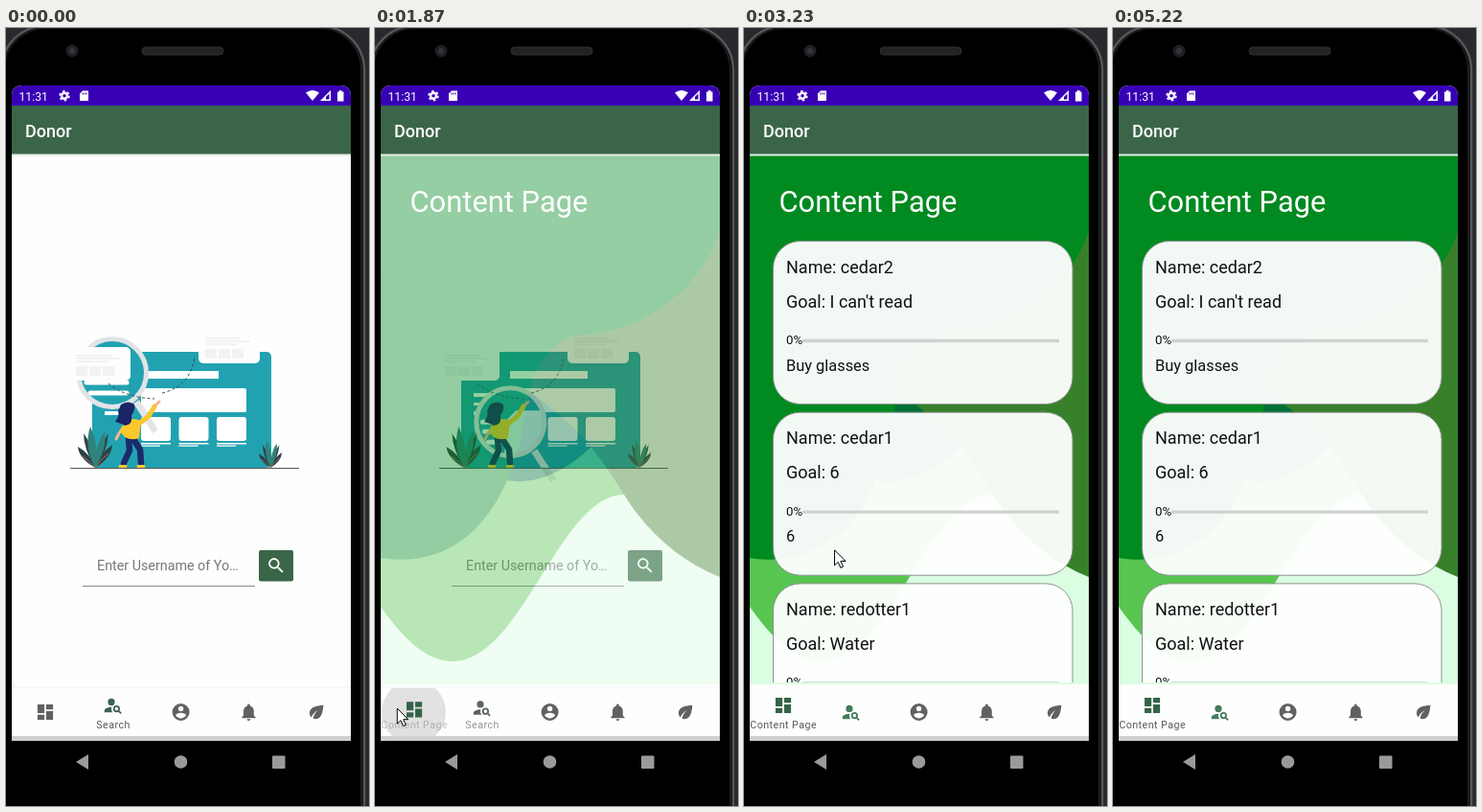
An HTML page for the animation above (5.76 s loop, 379 px wide and 812 px high).

```html
<!DOCTYPE html>
<html lang="en">
<head>
<meta charset="utf-8">
<title>Donor app</title>
<style>
  html, body { margin: 0; width: 100%; height: 100%; overflow: hidden; background: #28292d; }
  svg { display: block; width: 100vw; height: 100vh; font-family: Roboto, sans-serif; }
  .label { font-size: 10.7px; letter-spacing: .46px; text-anchor: middle; fill: #565c59; }
</style>
</head>
<body>
<svg viewBox="0 0 379 812">
  <defs>
    <clipPath id="screen"><path d="M6 744V71q0-11 11-11H349q11 0 11 11V744z"/></clipPath>
    <clipPath id="list"><rect x="27" y="218" width="320" height="465"/></clipPath>
    <clipPath id="nav"><rect x="6" y="689" width="354" height="51"/></clipPath>
    <clipPath id="glass"><circle r="35"/></clipPath>
    <g id="note">
      <rect width="64" height="35" rx="5" fill="#fdfdfd"/>
      <path d="M7 9H44M7 12H54M7 15H40" stroke="#f0f0f0" stroke-width="1.3"/>
      <path d="M7 20h12v10H7zM21 20h12v10H21zM35 20h12v10H35z" fill="#f2f2f2"/>
    </g>
    <g id="plant">
      <g fill="#2d4149">
        <path d="M0 0Q-17-10-18-22Q-5-15 0 0Q5-15 18-24Q17-10 0 0"/>
        <path d="M0 0Q-12-20-12-36Q0-20 0 0Q4-22 14-36Q12-14 0 0"/>
      </g>
      <path d="M0 0Q-12-22-5-43Q5-22 0 0Q0-25 10-38Q13-20 0 0" fill="#2f837c"/>
      <path d="M0 0Q-6-8-15-13M0 0Q7-10 14-15" fill="none" stroke="#d98b62" stroke-width=".7"/>
    </g>
  </defs>

  <!-- Phone -->
  <rect x="-5" y="-2" width="379" height="900" rx="46" fill="#000" stroke="#55585b" stroke-width="2.500"/>
  <rect x="-2" y="0" width="373" height="900" rx="43" fill="none" stroke="#1c1d1f" stroke-width="2"/>
  <circle cx="69" cy="24" r="6.5" fill="#1f2023"/><circle cx="69" cy="24" r="3" fill="#34363c"/>
  <rect x="142" y="20" width="85" height="8" rx="4" fill="#232325" stroke="#303033"/>
  <g fill="#9a9a9a">
    <path d="M73 766L86 758V774z"/><circle cx="182.500" cy="766" r="6.800"/><rect x="278" y="759.500" width="13.500" height="13.500" rx="1"/>
  </g>

  <g clip-path="url(#screen)">
    <rect x="6" y="60" width="354" height="684" fill="#fefefe"/>

    <!-- Search page -->
    <g id="searchPage">
      <rect x="90" y="338" width="187" height="121" rx="5" fill="#22a2b1"/>
      <g fill="#fff">
        <rect x="141" y="358" width="81" height="8"/>
        <rect x="141" y="376" width="110" height="25" rx="2"/>
        <g id="tiles"></g>
        <path d="M103 381h22v4h-22zM103 391h18v3h-18zM103 400h24v4h-24z"/>
      </g>
      <g id="lens">
        <path d="M25 30L45 61" stroke="#e3e5e7" stroke-width="7"/>
        <g clip-path="url(#glass)">
          <circle r="36" fill="#22a2b1"/>
          <path d="M-29 0H13M-27 10H15M-23 21H15" stroke="#fff" stroke-width="5" stroke-linecap="round"/>
          <path id="pale" d="M6-12H40V40H-6V0z" fill="#e1f5f7"/>
        </g>
        <circle r="35.500" fill="none" stroke="#e1e4e6" stroke-width="5"/>
      </g>
      <use href="#note" x="201" y="315"/>
      <use href="#note" x="66" y="333"/>
      <path d="M107 371Q125 386 155 387M163 381Q192 374 197 344" fill="none" stroke="#37474f" stroke-dasharray="3 2.500"/>
      <path d="M67 459.500H306" stroke="#555" stroke-width="1.200"/>
      <use href="#plant" id="plantL"/><use href="#plant" id="plantR"/>
      <!-- Woman -->
      <g fill="none" stroke-linecap="round" stroke-linejoin="round">
        <path d="M128 429L129 441L123 454M133 429L140 440L141 454" stroke="#1b2a6b" stroke-width="6.500"/>
        <path d="M119 457.500H125M138 457.500H144" stroke="#fdc82f" stroke-width="3"/>
        <path d="M125 413L118 423L115 429" stroke="#f6b58f" stroke-width="3"/>
        <path d="M139 413L149 405L155 395" stroke="#fdc82f" stroke-width="5"/>
        <path d="M156 394L160 390" stroke="#f6b58f" stroke-width="3"/>
      </g>
      <path d="M124 410Q132 406 141 410L139 428Q131 431 124 427L119 421z" fill="#fdc82f"/>
      <path d="M120 393Q128 388 134 393Q135 400 131 404Q133 414 124 415Q121 413 114 411Q119 404 117 400z" fill="#1b2467"/>
      <path d="M80 582.500H260" stroke="#8a8a8a"/>
      <text x="95" y="566" font-size="14.300" fill="#777">Enter Username of Yo…</text>
      <rect x="264" y="545" width="36" height="32.500" rx="2" fill="#3b6549"/>
      <path transform="translate(271.500 550.500) scale(.88)" fill="#fff" d="M15.500 14h-.79l-.28-.27C15.410 12.590 16 11.110 16 9.500 16 5.910 13.090 3 9.500 3S3 5.910 3 9.500 5.910 16 9.500 16c1.610 0 3.090-.59 4.230-1.570l.27.28v.79l5 4.990L20.490 19l-4.990-5zm-6 0C7 14 5 12 5 9.500S7 5 9.500 5 14 7 14 9.500 12 14 9.500 14z"/>
    </g>

    <!-- Content page -->
    <g id="contentPage">
      <rect x="6" y="132" width="354" height="553" fill="#dbfde2"/>
      <path d="M6 604C35 645 58 661 81 661C154 661 192 487 260 487V300H6z" fill="#58c551"/>
      <path d="M137 472C165 477 195 466 226 437L200 370H140z" fill="#007039"/>
      <path d="M160 380C200 405 230 437 260 487C284 526 318 556 360 573V200L190 300z" fill="#378029"/>
      <path d="M6 133V553C100 568 146 484 156 405C164 345 189 323 217 320C275 316 334 282 360 213V133z" fill="#008a20"/>
      <text x="36.500" y="192" font-size="30.900" fill="#fff">Content Page</text>
      <g clip-path="url(#list)">
        <g id="cards"></g>
        <path id="glow" d="M27 683Q187 671 347 683" fill="#777"/>
      </g>
    </g>

    <!-- App and status bars -->
    <rect x="6" y="131" width="354" height="2.500" fill="#e8ece9"/>
    <rect x="6" y="81" width="354" height="50.500" fill="#3b6549"/>
    <rect x="6" y="60" width="354" height="21" fill="#3800b5"/>
    <text x="20" y="114" font-size="18" font-weight="500" fill="#fff">Donor</text>
    <text x="13.500" y="75.500" font-size="12.200" fill="#fff">11:31</text>
    <g fill="#fff">
      <g fill="none" stroke="#fff">
        <circle cx="61" cy="70.800" r="3" stroke-width="2.400"/>
        <circle cx="61" cy="70.800" r="4.900" stroke-width="1.600" stroke-dasharray="2.565"/>
      </g>
      <path d="M80 65.500H86V76H77V68.500z"/>
      <path d="M80 67.500v2M82 67.500v2M84 67.500v2" stroke="#3800b5"/>
      <path d="M313 67.500Q320 62.500 327 67.500L320 76z"/>
      <path d="M339 65V76H328z"/><path d="M337.500 68.500V74.500H334V72z" fill="#3800b5"/>
      <path d="M346 66.500H348V65H350.500V66.500H352.500V76.500H346z"/>
    </g>

    <!-- Bottom navigation -->
    <rect x="6" y="685" width="354" height="55" fill="#fefefe"/>
    <path id="navLine" d="M6 688H360" stroke="#f1f1f1"/>
    <rect x="6" y="739" width="354" height="5" fill="#cfd1d0"/>
    <circle id="ripple" cx="40.500" cy="714" fill="#d5d5d5" clip-path="url(#nav)"/>
    <g id="icons"></g>
    <text class="label" id="homeLabel" x="41.200" y="730.500">Content Page</text>
    <text class="label" id="searchLabel" x="112" y="730.500">Search</text>
  </g>
  <path id="cursor" d="M0 0V16L3.700 12.600L6.300 18.500L9 17.300L6.400 11.600H11.500z" fill="#fff" stroke="#000"/>
</svg>
<script>
const LOOP = 5760;
const $ = id => document.getElementById(id);
const clamp = v => Math.min(1, Math.max(0, v));
const ramp = (t, from, to) => clamp((t - from) / (to - from));
const ease = p => (1 - Math.cos(Math.PI * p)) / 2;
const fade = (id, v) => $(id).setAttribute('opacity', v);
const place = (id, v) => $(id).setAttribute('transform', v);

// Keys are [time, x, y]; the result is a smooth curve through them.
function follow(keys, t) {
  let i = 0;
  while (i < keys.length - 2 && t >= keys[i + 1][0]) i++;
  const a = keys[i], b = keys[i + 1];
  const prev = keys[i - 1] || a, next = keys[i + 2] || b;
  const span = b[0] - a[0], p = ramp(t, a[0], b[0]);
  return [1, 2].map(k => {
    const m0 = (b[k] - prev[k]) / (b[0] - prev[0]) * span;
    const m1 = (next[k] - a[k]) / (next[0] - a[0]) * span;
    const d = b[k] - a[k];
    return a[k] + p * (m0 + p * (3 * d - 2 * m0 - m1 + p * (m0 + m1 - 2 * d)));
  });
}

$('tiles').innerHTML = [141, 180.5, 220].map(x =>
  `<rect x="${x}" y="406" width="31" height="25" rx="3"/>
   <path d="M${x} 433h31v1.500h-31zM${x} 435.500h20v1.300h-20z"/>`).join('');

const goals = [
  ['cedar2', "I can't read", 'Buy glasses'],
  ['cedar1', '6', '6'],
  ['redotter1', 'Water', "Don't drink beer, drink water"],
];
$('cards').innerHTML = goals.map(([name, goal, detail], i) => `<g id="card${i}">
  <rect x="30.500" y="222.500" width="312.500" height="170" rx="28" fill="#fff" fill-opacity=".95" stroke="#8f9490"/>
  <g fill="#111" font-size="18">
    <text x="44" y="255.500">Name: ${name}</text><text x="44" y="291.700">Goal: ${goal}</text>
    <text x="44" y="330" font-size="13.200">0%</text><text x="44" y="357.700" font-size="16.400">${detail}</text>
  </g>
  <path d="M61 326.500H329" stroke="#d0d1d0" stroke-width="3.300"/></g>`).join('');

const icons = [
  'M3 13h8V3H3zM3 21h8v-6H3zM13 21h8V11h-8zM13 3v6h8V3z',
  'M10 12a4 4 0 1 0 0-8a4 4 0 0 0 0 8zM10.350 14C7.600 13.900 2 15.300 2 18v2h9.540c-2.470-2.760-1.230-5.900-1.190-6zM19.430 18c.36-.6.57-1.260.57-2a4 4 0 1 0-4 4c.74 0 1.430-.2 2-.57L20.600 22 22 20.600zM16 18a2 2 0 1 1 0-4a2 2 0 0 1 0 4z',
  'M12 2a10 10 0 1 0 0 20a10 10 0 0 0 0-20zM12 5a3 3 0 1 1 0 6a3 3 0 0 1 0-6zM12 19.200c-2.500 0-4.700-1.280-6-3.220.03-2 4-3.080 6-3.080s5.970 1.080 6 3.080c-1.300 1.940-3.500 3.220-6 3.220z',
  'M12 22c1.100 0 2-.9 2-2h-4c0 1.100.9 2 2 2zM18 16v-5c0-3.070-1.640-5.640-4.500-6.320V4a1.500 1.500 0 0 0-3 0v.68C7.630 5.360 6 7.920 6 11v5l-2 2v1h16v-1z',
  'M6 8c-2.700 2.700-2.700 7.200 0 9.900 1.500-3.400 4.100-6.200 7.400-7.900-2.800 2.300-4.700 5.600-5.400 9.300 2.600 1.200 5.800.8 8-1.400C19.400 14.500 20 4 20 4S9.500 4.600 6 8z',
];
$('icons').innerHTML = icons.map((d, i) => `<path id="icon${i}" d="${d}" fill="#616161" fill-rule="evenodd"/>`).join('');
const placeIcon = (i, y) => place('icon' + i, `translate(${41 + 70.8 * i} ${y}) scale(.9) translate(-12 -12)`);

const lensPath = [[0, 111, 360], [550, 102, 363], [1010, 100, 378], [1740, 136, 409], [2000, 146, 412]];
const pointerVisits = [
  [[350, -12, 752], [600, 28, 740], [850, 38, 712], [1500, 38, 712], [1700, 41, 713], [1820, 41, 713], [1950, -14, 704]],
  [[3230, 94.5, 545], [3400, 105, 520], [3800, 165, 209], [4000, 177, 270], [4190, 177.5, 313], [4330, 177.5, 313],
   [4600, 190, 430], [4880, 235, 660], [5180, 340, 820]],
];

function draw(t) {
  const swap = ramp(t, 1780, 2000), shift = ease(swap);
  fade('contentPage', swap);
  $('searchPage').style.display = swap < 1 ? '' : 'none';

  const [lx, ly] = follow(lensPath, t);
  place('lens', `translate(${lx} ${ly})`);
  fade('pale', ramp(ly, 382, 407));
  const sway = 1.5 * Math.sin(t / 500);
  place('plantL', `translate(93 459) rotate(${sway})`);
  place('plantR', `translate(276 459) rotate(${-sway}) scale(.67)`);

  $('ripple').setAttribute('r', 33.5 * Math.sqrt(ramp(t, 1560, 1740)));
  fade('ripple', 1 - ramp(t, 1810, 2000));
  icons.forEach((d, i) => placeIcon(i, i ? 714 : 714 - 7 * shift));
  placeIcon(1, 707 + 7 * shift);
  const pressed = t >= 1640;
  $('icon0').setAttribute('fill', pressed ? '#35634a' : '#616161');
  $('icon1').setAttribute('fill', swap === 1 ? '#447c5c' : pressed ? '#5a6560' : '#3b6350');
  fade('homeLabel', shift);
  fade('searchLabel', 1 - shift);
  fade('navLine', 1 - swap);

  const scroll = 71.7 * (ease(ramp(t, 3370, 3720)) - ease(ramp(t, 4330, 4760)));
  goals.forEach((g, i) => {
    const enter = ease(ramp(t, 2180 + 60 * i, 2580 + 60 * i));
    place('card' + i, `translate(${320 * (enter - 1)} ${178.7 * i - scroll})`);
    fade('card' + i, enter);
  });
  fade('glow', .25 * ramp(t, 3650, 3850) * (1 - ramp(t, 3950, 4400)));

  const visit = pointerVisits.find(keys => t >= keys[0][0] && t <= keys[keys.length - 1][0]);
  $('cursor').style.display = visit ? '' : 'none';
  if (visit) place('cursor', `translate(${follow(visit, t)})`);
}

const start = performance.now();
function tick() {
  draw((performance.now() - start) % LOOP);
  requestAnimationFrame(tick);
}
tick();
</script>
</body>
</html>
```
